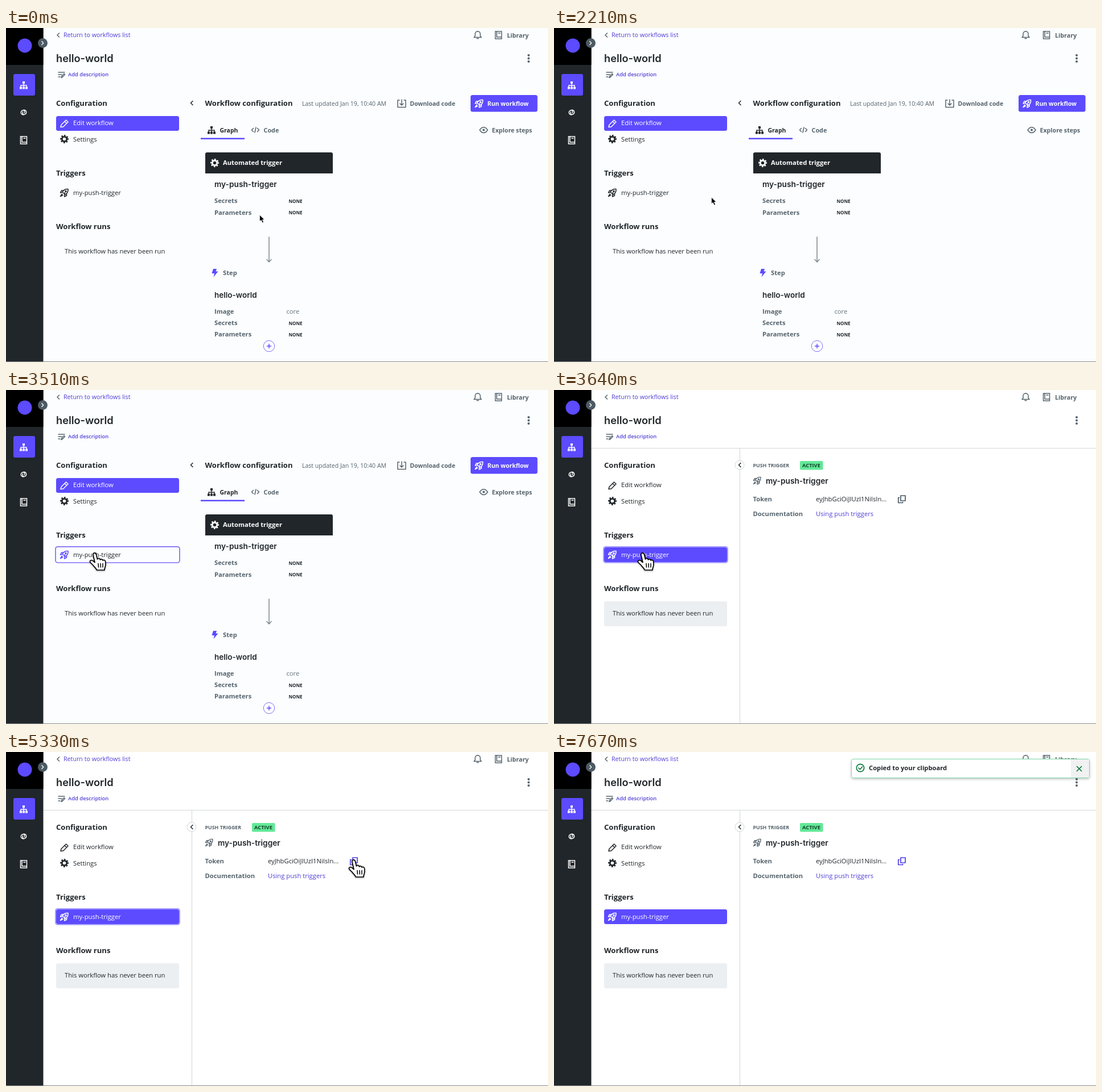
Recreate the animation shown at these times as an HTML page. Size 952 px wide and 588 px high, loop 7800 ms.

```html
<!DOCTYPE html>
<html lang="en">
<head>
<meta charset="utf-8">
<title>Workflow trigger</title>
<style>
html, body { margin: 0; width: 100%; height: 100%; overflow: hidden; background: #fff; }
svg { display: block; }
.stage { width: 952px; height: 588px; --ink: #20262a; --violet: #5c4bff; --gray: #56646d; }

text { font: 11.23px "Open Sans", "Noto Sans", sans-serif; fill: var(--ink); }
.b { font-weight: 700; fill: var(--gray); }
.h { font-size: 13.05px; font-weight: 700; }
.name { font: 600 13.7px Inter, sans-serif; }
.title { font: 600 18.2px Inter, sans-serif; }
.btn { font-size: 10.45px; font-weight: 700; fill: var(--gray); }
.none { font-size: 8.1px; font-weight: 700; }
.violet { fill: #4f3fd6; }
.white { fill: #fff; }
.icon { fill: none; stroke: currentColor; stroke-width: 1.5; stroke-linejoin: round; stroke-linecap: round; }
.ink { color: var(--ink); }
.gray { color: var(--gray); }
.accent { color: var(--violet); }
.light { color: #fff; }

.anim { animation: 7800ms step-end infinite; }
.config { animation-name: config; }
.detail { animation-name: detail; }
.ring { animation-name: ring; }
.rocket { animation-name: rocket; }
.label { animation-name: label; }
.copy { animation-name: copy; }
.toast { animation-name: toast; }
.pointer { animation-name: travel; }
.arrow { animation-name: arrow; }
.hand { animation-name: hand; }

@keyframes config { 0% { visibility: visible } 46.65%, 100% { visibility: hidden } }
@keyframes detail { 0% { visibility: hidden } 46.65%, 100% { visibility: visible } }
@keyframes ring {
  0% { visibility: hidden; stroke: #7c70f5 }
  33.32% { visibility: visible; stroke: #7c70f5 }
  46.65% { visibility: visible; stroke: #9a91ff }
  69.98%, 100% { visibility: hidden; stroke: #9a91ff }
}
@keyframes rocket { 0% { color: #20262a } 33.32% { color: #5c4bff } 46.65%, 100% { color: #fff } }
@keyframes label { 0% { fill: #20262a } 46.65%, 100% { fill: #fff } }
@keyframes copy { 0% { color: #4c5a63 } 66.65%, 100% { color: #5040e0 } }
@keyframes toast { 0% { visibility: hidden } 69.98%, 100% { visibility: visible } }
@keyframes travel {
  0% { transform: translate(445px, 329px) }
  26.65% { transform: translate(390px, 318px) }
  28.32% { transform: translate(276px, 298px) }
  29.98% { transform: translate(205px, 292px) }
  31.65% { transform: translate(172px, 289px) }
  33.32% { transform: translate(156px, 288px) }
  49.98% { transform: translate(156px, 288px); animation-timing-function: steps(6) }
  59.98% { transform: translate(548px, 151px) }
  61.65% { transform: translate(548px, 151px); animation-timing-function: steps(3) }
  66.65% { transform: translate(611px, 191px) }
  84.98% { transform: translate(611px, 191px); animation-timing-function: steps(6) }
  94.98%, 100% { transform: translate(690px, 610px) }
}
@keyframes arrow {
  0% { visibility: visible } 33.32% { visibility: hidden } 51.65% { visibility: visible }
  66.65% { visibility: hidden } 86.65%, 100% { visibility: visible }
}
@keyframes hand {
  0% { visibility: hidden } 33.32% { visibility: visible } 51.65% { visibility: hidden }
  66.65% { visibility: visible } 86.65%, 100% { visibility: hidden }
}
</style>
</head>
<body>
<svg class="stage" viewBox="0 0 952 588">
  <defs>
    <g id="tree">
      <path d="M0-3V0M-5 3V0H5V3M0 0V3" fill="none" stroke="currentColor" stroke-width="1.4"/>
      <path d="M-2-7h4v4h-4zM-7 2.5h4v4h-4zM-2 2.5h4v4h-4zM3 2.5h4v4h-4z" fill="currentColor"/>
    </g>
    <g id="gear" fill="none" stroke="currentColor">
      <circle r="4.2" stroke-width="2.8"/>
      <circle r="6.3" stroke-width="2.4" stroke-dasharray="2.6 2.35" transform="rotate(-12)"/>
    </g>
    <g id="rocket" class="icon">
      <path d="M6.5-6.5C1.5-7-1.500-4.500-3.500-1.500L1.500 3.500C4.500 1.500 7-1.500 6.500-6.500ZM-2-4H-5L-7 0-3.500-1M4 2V5L0 7 1-.5M-4 2-7 6.500-2.500 4"/>
      <circle cx="2.500" cy="-2.500" r="1"/>
    </g>
    <g id="book" class="icon">
      <path d="M-5.500-6.500H5.500V6.500H-5.500ZM-3 3.500H5.500M-3-6V3M0-3.500H3" stroke-linejoin="miter"/>
    </g>
    <path id="back" class="icon" d="M2-3.500-1.500 0 2 3.500"/>
    <filter id="shade" x="-10%" y="-30%" width="120%" height="200%">
      <feDropShadow dx="0" dy="2" stdDeviation="2" flood-opacity=".22"/>
    </filter>
    <filter id="drop" x="-40%" y="-30%" width="180%" height="180%">
      <feDropShadow dx="0" dy="1.500" stdDeviation="1" flood-opacity=".3"/>
    </filter>
  </defs>

  <rect width="952" height="588" fill="#fff"/>
  <rect class="anim config" width="952" height="588" fill="#fbfdff"/>

  <g class="anim detail" fill="none" stroke="#d2d6d9">
    <path d="M65 102.500H952M326.500 102.500V587"/>
    <circle cx="326" cy="132" r="8" fill="#fff"/>
    <rect x="88" y="372" width="216" height="44" rx="3" fill="#eceff2" stroke="none"/>
  </g>

  <!-- Sidebar -->
  <rect width="65.500" height="588" fill="#20262a"/>
  <rect width="65.500" height="65" fill="#000"/>
  <circle cx="33" cy="31" r="12.500" fill="#5c4bff"/>
  <circle cx="64.500" cy="26.500" r="8.500" fill="#4c5a63"/>
  <use class="light" href="#back" transform="translate(64.500 26.500) scale(-.85 .85)"/>
  <rect x="13" y="81" width="38" height="38" rx="3" fill="#5c4bff"/>
  <use class="light" href="#tree" x="31" y="101"/>
  <g class="icon light" transform="translate(31 148.500)" stroke-width="1.800">
    <path d="M1 3.800A4 4 0 1 1 1-3.400 4 4 0 0 1 1.500 1M-1-3.800A4 4 0 1 1-1 3.400 4 4 0 0 1-1.500-1"/>
  </g>
  <use class="light" href="#book" x="31" y="197.500"/>

  <!-- Header -->
  <use class="gray" href="#back" x="91.500" y="12.500"/>
  <text class="violet" x="101" y="16.300" style="font-size:10.7px">Return to workflows list</text>
  <text class="title" x="88" y="60">hello-world</text>
  <path class="icon gray" stroke-width="1.200" d="M92 78H103M92 82H98M92 86H95M97 87.500 98 84.500 102 80.500 103.500 82 99.500 86Z"/>
  <text class="violet" x="109" y="85.200" style="font-size:9.4px;font-weight:600">Add description</text>
  <path class="icon gray" d="M822 16.500H835L833 14V10.500C833 4.500 824 4.500 824 10.500V14ZM827 18.500H830M828.500 5.500V6"/>
  <use class="gray" href="#book" x="865" y="12.500"/>
  <text class="btn" x="880" y="17" style="font-size:10.7px">Library</text>
  <g fill="#56646d"><circle cx="918" cy="48" r="2"/><circle cx="918" cy="53.500" r="2"/><circle cx="918" cy="59" r="2"/></g>

  <!-- Navigation -->
  <text class="h" x="88" y="137">Configuration</text>
  <use class="ink" href="#back" x="326" y="132"/>
  <g id="edit">
    <path class="icon ink" d="M96 174.500 97 170.500 105.500 162 109 165.500 100.500 174ZM103 164.500 106.500 168"/>
    <text x="118" y="171.300">Edit workflow</text>
  </g>
  <g class="anim config">
    <rect x="88" y="155" width="216" height="26" rx="3.500" fill="#5c4bff"/>
    <path class="icon light" d="M96 174.500 97 170.500 105.500 162 109 165.500 100.500 174ZM103 164.500 106.500 168"/>
    <text class="white" x="118" y="171.300">Edit workflow</text>
  </g>
  <use class="ink" href="#gear" x="102.500" y="195.500"/>
  <text x="118" y="199.500">Settings</text>
  <text class="h" x="88" y="259.500">Triggers</text>
  <rect class="anim detail" x="88" y="277" width="216" height="26" rx="3.500" fill="#5c4bff"/>
  <rect class="anim ring" x="87" y="275.800" width="218" height="28.200" rx="4" fill="none" stroke-width="1.700"/>
  <g class="anim rocket"><use href="#rocket" x="102.500" y="290"/></g>
  <text class="anim label" x="118" y="293.500">my-push-trigger</text>
  <text class="h" x="88" y="353.700">Workflow runs</text>
  <text x="103" y="397.200">This workflow has never been run</text>

  <!-- Workflow configuration -->
  <g class="anim config">
    <text class="h" x="349.500" y="136.500">Workflow configuration</text>
    <text x="520" y="136.500" style="font-size:10.55px;fill:#56646d">Last updated Jan 19, 10:40 AM</text>
    <path class="icon gray" d="M691 127H688V139.500H702V127H699M695 126V135.500M692 133 695 136 698 133"/>
    <text class="btn" x="709.500" y="136.500">Download code</text>
    <rect x="816" y="118" width="117.500" height="29.500" rx="3.500" fill="#5c4bff"/>
    <use class="light" href="#rocket" x="831" y="133"/>
    <text class="btn white" x="845.500" y="136.500">Run workflow</text>
    <use class="ink" href="#tree" x="361" y="180"/>
    <text class="btn" x="375.500" y="183.500" style="fill:#20262a">Graph</text>
    <path d="M342 194.800H419" stroke="#5c4bff" stroke-width="2.400"/>
    <path class="icon gray" d="M434.500 176.500 431.500 179.500 434.500 182.500M441.500 176.500 444.500 179.500 441.500 182.500M439 175 437 184"/>
    <text class="btn" x="452.500" y="183.500" style="font-size:10.8px">Code</text>
    <path class="icon gray" d="M832 179.500C836 173 842 173 846 179.500 842 186 836 186 832 179.500Z"/>
    <circle cx="839" cy="179.500" r="2" fill="#56646d"/>
    <text class="btn" x="853.500" y="183.500" style="font-size:10.65px">Explore steps</text>

    <path d="M350 256V222Q350 219 353 219H571Q574 219 574 222V256Z" fill="#20262a"/>
    <use class="light" href="#gear" x="366.500" y="237.500"/>
    <text class="b white" x="381" y="241.200">Automated trigger</text>
    <text class="name" x="366" y="280">my-push-trigger</text>
    <text class="b" x="366" y="308">Secrets</text><text class="none" x="496.500" y="308">NONE</text>
    <text class="b" x="366" y="328.500">Parameters</text><text class="none" x="496.500" y="328.200">NONE</text>
    <path class="icon" stroke="#7d878d" d="M462 368V411.500M458 407.500 462 412 466 407.500" style="color:#7d878d"/>
    <path d="M364 424H370L368.500 428.500H372.500L364.500 438.500 366 432H361.500Z" fill="#5c4bff"/>
    <text class="b" x="381" y="435.300">Step</text>
    <text class="name" x="366" y="474.800" style="font-size:13.5px">hello-world</text>
    <text class="b" x="366" y="503">Image</text><text x="492.500" y="503" style="fill:#66727a">core</text>
    <text class="b" x="366" y="522.700">Secrets</text><text class="none" x="496.500" y="522.500">NONE</text>
    <text class="b" x="366" y="543">Parameters</text><text class="none" x="496.500" y="542.700">NONE</text>
    <circle cx="462" cy="560" r="9.700" fill="#fff" stroke="#7c70f5"/>
    <path class="icon accent" d="M458.500 560H465.500M462 556.500V563.500"/>
  </g>

  <!-- Trigger detail -->
  <g class="anim detail">
    <text class="b" x="349.500" y="135.800" style="font-size:8.85px">PUSH TRIGGER</text>
    <rect x="432" y="125" width="40.500" height="15.500" rx="2" fill="#63e898"/>
    <text class="b" x="436" y="136" style="font-size:9.3px;fill:#12422a">ACTIVE</text>
    <use class="gray" href="#rocket" transform="translate(357 159.500) scale(.93)"/>
    <text class="name" x="372" y="164.500">my-push-trigger</text>
    <text class="b" x="349.500" y="196">Token</text>
    <text x="460" y="196">eyJhbGciOiJIUzI1NiIsIn...</text>
    <text class="b" x="349.500" y="222.300">Documentation</text>
    <text class="violet" x="460" y="222.300">Using push triggers</text>
    <g class="anim copy">
      <path class="icon" d="M609 186H617V195H609ZM606.500 189.500H604.800V198.500H612.500V197.500" style="stroke-linejoin:miter;stroke-width:1.700"/>
    </g>
  </g>

  <g class="anim toast">
    <rect x="522.500" y="12.500" width="418" height="33" rx="3" fill="#fff" stroke="#7ddaa8" filter="url(#shade)"/>
    <path d="M908 13H938Q940 13 940 15V43Q940 45 938 45H908Z" fill="#f0f1f1"/>
    <g class="icon" style="color:#087a3c;stroke-width:1.700">
      <circle cx="538" cy="28" r="6.700"/>
      <path d="M535 28 537.500 30.500 541.500 26M918.500 25.500 926.500 33.500M926.500 25.500 918.500 33.500"/>
    </g>
    <text class="b" x="553" y="31.500" style="fill:#20262a">Copied to your clipboard</text>
  </g>

  <rect y="587" width="952" height="1" fill="#858a8d"/>

  <g class="anim pointer">
    <path class="anim arrow" d="M.5 0V11.500L3.200 9.200 5.300 14 7.500 13 5.400 8.400H9Z" fill="#000" stroke="#fff" stroke-width=".8"/>
    <g class="anim hand" stroke="#000" stroke-width="1.700" stroke-linejoin="round" stroke-linecap="round" filter="url(#drop)">
      <path d="M-3 2.500C-4-2 1.500-2.500 2.500 1.500L4.500 10C5.500 7.500 9 8 9.500 11 10.500 9 13.500 9.500 14 12 15.500 10.500 18.500 11.500 18.700 14.500L19 19C19 23 17 25 17 29H3.500C2.500 26-1 23.500-3 20.500L-8 15.500C-10 12-5.500 10.500-3 13L0 15.500Z" fill="#fff"/>
      <path d="M6 17.500 6.500 24M10 17.500 10.300 24M14 17.500V24" fill="none" stroke-width="1.500"/>
    </g>
  </g>
</svg>
</body>
</html>
```
